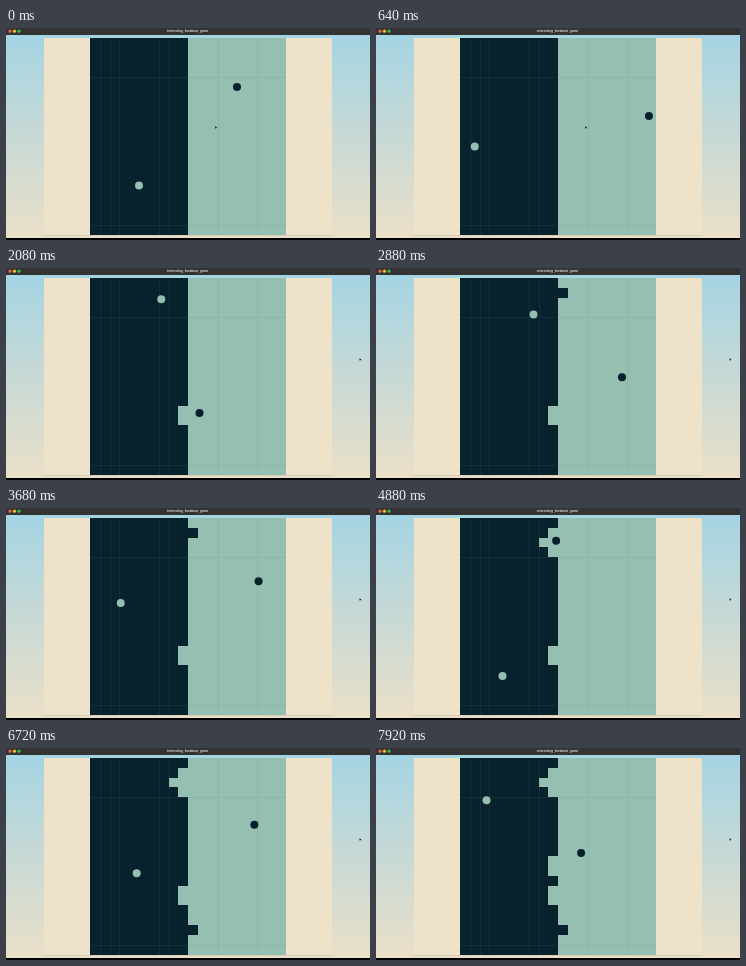
An HTML page with a canvas for the animation above (8 s loop, 364 by 212 pixels).

```html
<!DOCTYPE html>
<html lang="en">
<head>
<meta charset="utf-8">
<title>Breakout</title>
<style>
  html, body { margin: 0; width: 100%; height: 100%; overflow: hidden; background: #000; }
  canvas { display: block; width: 364px; height: 212px; }
</style>
</head>
<body>
<canvas id="stage" width="364" height="212"></canvas>
<script>
const ctx = document.getElementById('stage').getContext('2d');
const DARK = '#07212d', LIGHT = '#94bfb1', SAND = '#eee2c8';
const LOOP = 8000, STEP = 80;
const LEFT = 84, TOP = 10, CELL = 9.82;

// Cells that change side: time, column, row, new colour
const flips = [
  [1992, 9, 13, LIGHT], [1992, 9, 14, LIGHT],
  [2504, 10, 1, DARK], [4544, 10, 1, LIGHT],
  [4680, 9, 2, LIGHT], [4680, 9, 3, LIGHT],
  [4832, 9, 1, LIGHT], [4832, 8, 2, LIGHT],
  [5833, 10, 17, DARK],
  [7645, 9, 10, LIGHT], [7645, 9, 11, LIGHT]
];

// Bounce points of the dark ball: time, x, y
const darkPath = [
  [0, 231, 59], [681, 275.6, 89.8], [1992, 187.7, 149],
  [3330, 275.5, 89], [4544, 196, 34.5], [4696, 186, 41.2],
  [4832, 177, 35], [5292, 207, 14.5], [6310, 275.5, 58.7],
  [7645, 187.2, 117.7], [8000, 210.3, 101.4]
];
const cursorPath = [
  [0, 209.3, 98], [1440, 209.3, 98], [1760, 332, 92],
  [1880, 353.6, 90], [8000, 353.6, 90]
];

function along(path, t) {
  const i = path.findIndex(p => p[0] > t);
  const [t0, x0, y0] = path[i - 1], [t1, x1, y1] = path[i];
  const k = (t - t0) / (t1 - t0);
  return [x0 + (x1 - x0) * k, y0 + (y1 - y0) * k];
}

// Bounce a steadily growing value between lo and hi
function fold(v, lo, hi) {
  const span = hi - lo, m = (((v - lo) % (2 * span)) + 2 * span) % (2 * span);
  return lo + (m < span ? m : 2 * span - m);
}

function box(color, x, y, w, h) {
  ctx.fillStyle = color;
  ctx.fillRect(x, y, w, h);
}

function disc(color, x, y, r) {
  ctx.fillStyle = color;
  ctx.beginPath();
  ctx.arc(x, y, r, 0, 2 * Math.PI);
  ctx.fill();
}

function cell(col, row, color) {
  const x = Math.round(LEFT + col * CELL), y = Math.round(TOP + row * CELL);
  box(color, x, y, Math.round(LEFT + (col + 1) * CELL) - x,
    Math.round(TOP + (row + 1) * CELL) - y);
}

function drawWindow() {
  const sky = ctx.createLinearGradient(0, 7, 0, 210);
  sky.addColorStop(0, '#a5d4e3');
  sky.addColorStop(1, '#eadfc8');
  box('#000', 0, 0, 364, 212);
  box(sky, 0, 7, 364, 203);
  box('#333333', 0, 0, 364, 7);
  ['#f25f57', '#f5bd2e', '#2bc440'].forEach((c, i) => disc(c, 4 + i * 4.5, 3.2, 1.6));
  ctx.fillStyle = '#d8d8d8';
  ctx.font = 'bold 3.2px "Liberation Sans", Arial, sans-serif';
  ctx.textAlign = 'center';
  ctx.fillText('interesting_breakout_game', 181.5, 4.3);
  box(SAND, 38, 10, 288, 197);
  box('#d9cfb8', 38, 207, 288, 1);
}

function drawField(t) {
  box(DARK, LEFT, TOP, 98, 197);
  box(LIGHT, 182, TOP, 98, 197);
  for (const [at, col, row, color] of flips) if (t >= at) cell(col, row, color);
  const seam = 'rgba(90,130,130,0.14)';
  for (const i of [1, 2, 3, 7, 8, 13, 17]) box(seam, Math.round(LEFT + i * CELL), TOP, 1, 197);
  for (const i of [4, 19]) box(seam, LEFT, Math.round(TOP + i * CELL), 196, 1);
}

function drawCursor(x, y) {
  ctx.beginPath();
  [[0, 0], [0, 2.8], [0.8, 2.2], [1.9, 2]].forEach(([dx, dy]) => ctx.lineTo(x + dx, y + dy));
  ctx.closePath();
  ctx.strokeStyle = 'rgba(255,255,255,0.35)';
  ctx.lineWidth = 0.5;
  ctx.stroke();
  ctx.fillStyle = '#000';
  ctx.fill();
}

function draw(t) {
  const n = t / STEP;
  drawWindow();
  drawField(t);
  disc(LIGHT, fold(133 - 4.28 * n, 88.5, 177.8), fold(157.5 - 4.86 * n, 14.5, 202.5), 4);
  disc(DARK, ...along(darkPath, t), 4);
  drawCursor(...along(cursorPath, t));
}

const start = performance.now();
function tick(now) {
  const t = Math.max(0, now - start) % LOOP;
  draw(Math.min(Math.floor((t + 1) / STEP) * STEP, LOOP - STEP));
  requestAnimationFrame(tick);
}
draw(0);
requestAnimationFrame(tick);
</script>
</body>
</html>
```
